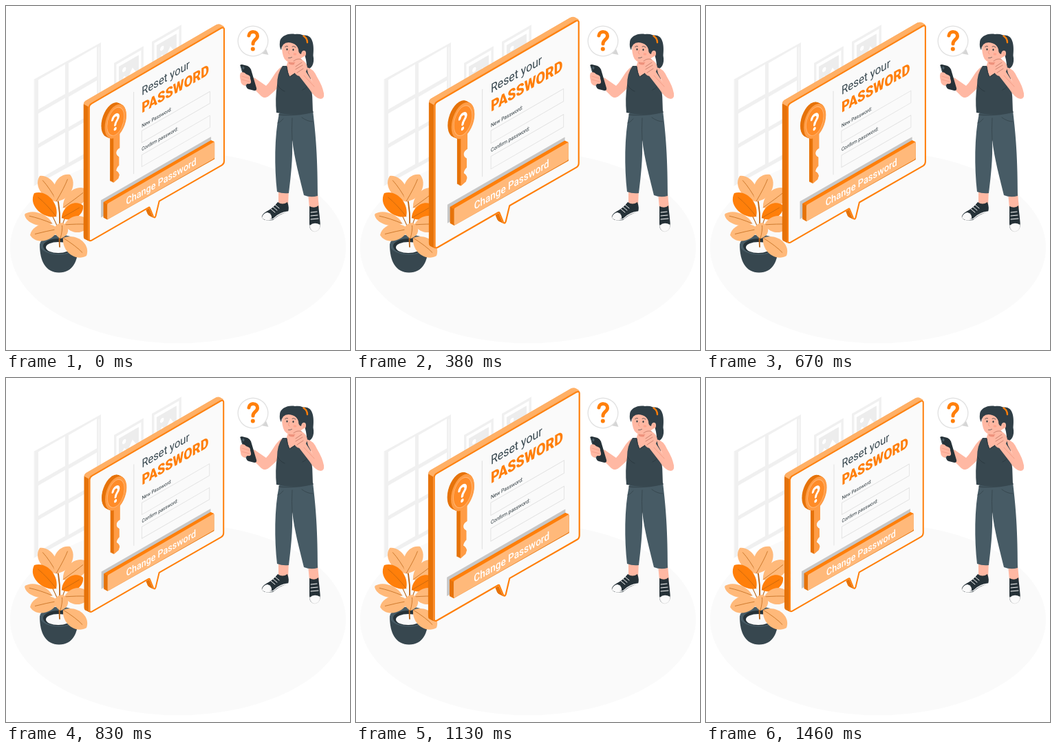
Write an HTML page with a canvas that moves like this. It is 500 px wide and 500 px high and loops after 1.5 s.

```html
<!DOCTYPE html>
<html lang="en">
<head>
<meta charset="utf-8">
<title>Reset your password</title>
<style>
html, body { margin: 0; width: 100%; height: 100%; overflow: hidden; background: #fff; }
canvas { display: block; width: 500px; height: 500px; }
</style>
</head>
<body>
<canvas id="stage"></canvas>
<script>
const canvas = document.getElementById('stage');
const ctx = canvas.getContext('2d');
const ratio = window.devicePixelRatio || 1;
canvas.width = canvas.height = 500 * ratio;

const ORANGE = '#ff7f0a', DEEP = '#e6730a', LIGHT = '#ffb97a', INK = '#263238',
      HAIR = '#2f3e46', SLATE = '#37474f', DENIM = '#475b65', SKIN = '#ffb8a3',
      BLUSH = '#ee927c', PAPER = '#fafafa', MIST = '#f0f0f0', LINE = '#e0e0e0', VEIN = '#b9600f';

function fill(path, color) {
  ctx.fillStyle = color;
  ctx.fill(new Path2D(path));
}

function line(path, color, width = 1) {
  ctx.strokeStyle = color;
  ctx.lineWidth = width;
  ctx.stroke(new Path2D(path));
}

function ellipse(x, y, rx, ry, color, turn = 0) {
  ctx.fillStyle = color;
  ctx.beginPath();
  ctx.ellipse(x, y, rx, ry, turn, 0, Math.PI * 2);
  ctx.fill();
}

// Runs draw() on the isometric wall plane with its origin at (x, y).
function onWall(x, y, draw) {
  ctx.save();
  ctx.transform(0.866, -0.5, 0, 1, x, y);
  draw();
  ctx.restore();
}

function wallText(text, x, y, font, color) {
  onWall(x, y, () => {
    ctx.font = font + ' Roboto, sans-serif';
    ctx.fillStyle = color;
    ctx.fillText(text, 0, 0);
  });
}

function questionMark(x, y, size, color, weight) {
  ctx.save();
  ctx.translate(x, y);
  ctx.scale(size, size);
  line('M-6 -7 C-5 -14.5 6.5 -14 6.5 -6.5 C6.5 -1 0 -1 0 5', color, weight);
  ellipse(-0.2, 12.5, weight * 0.6, weight * 0.6, color);
  ctx.restore();
}

function drawWindow() {
  fill('M40 107 L138 53 V208 L40 262 Z', MIST);
  line('M40.5 107 V261', PAPER, 1.5);
  for (const [x, w] of [[47, 39], [91, 41]]) {
    for (const [y, h] of [[4, 43], [53, 44], [103, 46]]) {
      onWall(x, 107 - (x - 40) * 0.551 + y, () => {
        ctx.fillStyle = '#fff';
        ctx.fillRect(0, 0, w / 0.866, h);
      });
    }
  }
  line('M135 60 V204', PAPER, 1);
}

function drawPicture(x, y) {
  onWall(x, y, () => {
    ctx.fillStyle = MIST;
    ctx.fillRect(0, 0, 49.5, 68);
    ctx.fillStyle = '#fff';
    ctx.fillRect(4, 4, 41.5, 60);
    ctx.fillStyle = '#ededed';
    ctx.fillRect(8, 9, 33.5, 50);
    fill('M8 40 L17 27 L23 34 L31 22 L41.5 38 V59 H8 Z', '#fff');
    ellipse(17, 18, 3.2, 3.2, '#fff');
  });
}

function leaf(x1, y1, x2, y2, width, color) {
  const length = Math.hypot(x2 - x1, y2 - y1);
  ctx.save();
  ctx.translate(x1, y1);
  ctx.rotate(Math.atan2(y2 - y1, x2 - x1));
  ctx.scale(length, width);
  fill('M0 0 C.2 -.65 .85 -.78 1 0 C.85 .65 .25 .7 0 0 Z', color);
  ctx.restore();
  line(`M${x1} ${y1} Q${(x1 + x2) / 2 + 2} ${(y1 + y2) / 2 - 1} ${x1 + (x2 - x1) * 0.82} ${y1 + (y2 - y1) * 0.82}`, VEIN, 0.7);
}

function drawPlant() {
  fill('M49 346 C49 372 58 387 77 387.5 C97 387 105 372 105 346 Z', SLATE);
  ellipse(77, 347, 28, 14.5, DENIM);
  ellipse(77, 349, 23, 11, INK);
  ellipse(76, 351, 18, 8, PAPER);
  line('M78 350 C76 325 82 304 73 272', VEIN, 1.8);
  line('M78 337 C82 313 88 300 99 281 M77 326 Q66 300 57 286', VEIN, 1.1);
  leaf(74, 284, 49, 247, 22, LIGHT);
  leaf(73, 284, 93, 245, 25, LIGHT);
  leaf(83, 293, 118, 267, 23, LIGHT);
  leaf(73, 306, 41, 272, 25, ORANGE);
  leaf(81, 308, 112, 290, 20, ORANGE);
  leaf(67, 316, 27, 303, 17, LIGHT);
  leaf(85, 318, 121, 317, 23, LIGHT);
  leaf(76, 324, 35, 333, 23, LIGHT);
  leaf(79, 338, 82, 315, 19, LIGHT);
  leaf(83, 337, 117, 363, 25, LIGHT);
}

const FRONT = 'M121 148 Q121 144 125 141.5 L311.5 33 Q316.7 31 316.7 36 V225 Q316.7 229.5 313 231.7 ' +
  'L223.5 283 L218.5 304 Q216.5 309.5 213 304.5 L208 292.3 L126.5 339.3 Q121 342 121 336 Z';

function drawKey() {
  const face = '#ff9c45';
  const shaft = 'M157 186 L166 182 V206 Q161 209 161 213 Q161 217 165 219 V231 ' +
    'Q161 235 161 239 Q165 241 165.5 245 L164 250 L157 256 Z';
  const head = color => onWall(160, 168, () => ellipse(0, 0, 18, 23, color));
  for (let depth = 5; depth >= 0; depth -= 0.5) {
    ctx.save();
    ctx.translate(-depth, -depth * 0.5);
    const color = depth ? DEEP : face;
    fill(shaft, color);
    head(color);
    ctx.restore();
  }
  onWall(160, 168, () => {
    ellipse(0, 0, 14.6, 19.4, LIGHT);
    ellipse(0, 0, 13.8, 18.6, '#ff8c28');
    questionMark(-0.5, 0.6, 0.78, '#fff', 5);
  });
}

function drawButton() {
  fill('M139 281 L297 190 V214 L139 306 Z', '#c7c7c7');
  fill('M142.5 284 L297 195 L302 198 V222 L148 309 L142.5 306 Z', DEEP);
  fill('M143 284 L297 195 L302 197 L148 287 Z', ORANGE);
  fill('M148 288 Q148 286 150 285 L300 198 Q302 197 302 199 V219 Q302 221 300 222 L150 308 Q148 309 148 307 Z', LIGHT);
  wallText('Change Password', 175, 288, '500 14.4px', '#fff');
}

function drawPanel() {
  for (let depth = 7; depth >= 0; depth -= 0.5) {
    ctx.save();
    ctx.translate(-depth, -depth * 0.5);
    fill(FRONT, depth ? DEEP : PAPER);
    ctx.restore();
  }
  fill('M114 143 Q114.5 139 118 137.5 L304 29.5 Q308 27.5 311 29 L316 32 L311 33 L125 141.5 Q121.5 143.5 121 147 Z', '#ffb066');
  ctx.save();
  ctx.clip(new Path2D(FRONT));
  line(FRONT, ORANGE, 4);
  ctx.restore();

  line('M186 126 V243', LINE, 1);
  drawKey();
  wallText('Reset your', 197.5, 131, '400 16.9px', SLATE);
  wallText('PASSWORD', 197.5, 156, '900 20.8px', ORANGE);
  wallText('New Password:', 197.5, 177, '400 7.2px', INK);
  wallText('Confirm password:', 197.5, 210.5, '400 7.2px', INK);
  for (const y of [181.5, 216]) {
    onWall(197.5, y, () => {
      ctx.strokeStyle = LINE;
      ctx.lineWidth = 0.9;
      ctx.strokeRect(0, 0, 113, 17);
    });
  }
  drawButton();
}

function drawBubble() {
  fill('M371 69 L381.5 71 L377 60 Z', '#d5d5d5');
  ellipse(359, 51, 22.5, 22.5, LINE);
  ellipse(359, 51, 21.2, 21.2, '#fff');
  questionMark(359, 50, 1, ORANGE, 5);
}

function drawLegs() {
  fill('M396 266 H411 L410 290 H396 Z M439 272 H453 L455 294 H441 Z', SKIN);
  fill('M397 156 L446 152 C449 178 453 210 453 276 Q443 279 433 275 C427 250 419 222 416 194 C417 222 414 247 411 272 ' +
    'Q402 273 394 270 C390 234 390 190 397 156 Z', DENIM);
  line('M416 163 Q415 180 416 196 M403 164 Q399 169 395 170 M430 162 Q438 168 446 168', SLATE, 0.9);
  line('M397 158 Q421 160 446 154', SLATE, 1.6);
}

function drawShoes() {
  fill('M395 285 Q402 290 409 285 Q412 293 410 299 Q398 302 388 311 Q376 313 372 308 Q371 303 378 299 Q388 294 395 285 Z', INK);
  fill('M372 307 Q374 301 380 300 Q387 302 386 309 Q377 313 372 307 Z', PAPER);
  line('M372.5 308 Q380 313 389 309 Q398 300 410 299', '#fff', 1.3);
  line('M385 295 l6 5 M388 292 l6 5 M391 289 l6 5', '#fff', 1);
  fill('M441 291 Q449 295 454 290 Q456 306 457 319 Q455 329 447 328 Q440 325 441 316 Z', INK);
  fill('M441.5 319 Q448 313 456.5 318 Q457 328 448 328.5 Q441 326 441.5 319 Z', PAPER);
  line('M441 318 Q443 328 449 328 Q457 326 457 317', LINE, 0.8);
  line('M443 300 l9 -1 M443 305 l10 -1 M443 310 l11 -1', '#fff', 1);
}

function drawHead() {
  fill('M430 43 C447 39 448 58 446.5 72 C449 84 444 92 437 92 C438 79 433 67 429 57 Z', HAIR);
  fill('M411 76 L426 74 L428 92 Q420 102 412 102 L407 89 Z', SKIN);
  fill('M411 80 Q418 83 425 77 L424 82 Q418 88 411 84 Z', BLUSH);
  fill('M402 53 Q412 46 428 52 L434 65 Q436 73 430 75 Q426 81 418 82 Q406 83 403 73 Q400 64 402 53 Z', SKIN);
  fill('M398 53 C398 44 410 39 420 41 C432 39 440 46 439 56 Q439 66 434 68 Q430 63 429 70 ' +
    'Q425 69 425 63 Q423 56 416 54 Q408 51 403 56 Q400 60 400 64 Q397 60 398 53 Z', HAIR);
  ellipse(433, 69, 3, 4.2, SKIN);
  line('M432 67 Q435 69 432 72', BLUSH, 0.7);
  line('M432.5 43.5 Q438 47 438 53', ORANGE, 2.4);
  ellipse(408.5, 63, 1, 1.5, INK);
  ellipse(417.5, 63.5, 1, 1.5, INK);
  line('M405.5 59.5 Q407 57.5 409.5 58.5 M416 59 Q418.5 57.5 421 60', INK, 0.7);
  line('M412 64 Q409 69 412 70', BLUSH, 0.8);
  line('M410.5 75.5 Q413 76 415.5 74.5', INK, 0.6);
  ellipse(420, 70, 2.4, 1.7, '#ffa58e');
}

function drawPhoneArm() {
  fill('M401 88 C391 94 388 106 378 116 L365 107 Q360 102 356 106 L359 119 L371 131 Q377 136 383 130 ' +
    'C391 123 396 119 399 111 Z', SKIN);
  fill('M341 88 Q339 85 343 85 L351 87 Q355 89 356 92 L364 119 Q365 123 361 123 L353 121 Q350 120 349 117 Z', INK);
  line('M341.5 88 L350 117', DENIM, 0.9);
  ellipse(345, 90, 1.5, 2.2, DENIM);
  fill('M341 97 Q346 95 349 99 Q356 101 355 105 L356 109 Q357 114 351 113 L347 116 Q341 114 341 108 Q339 102 341 97 Z', SKIN);
  line('M343 102 L353 105 M343 107 L354 110', BLUSH, 0.6);
}

function drawChinArm() {
  fill('M437 89 Q447 91 452 103 Q460 116 462 127 Q463 135 457 135 Q449 134 441 121 L424 99 ' +
    'L433 91 L446 111 L439 98 Z', SKIN);
  fill('M420 82 Q425 75 430 78 Q438 82 438 91 L434 99 Q426 105 421 99 Q417 94 421 91 Q417 86 420 82 Z', SKIN);
  line('M421 88 L430 82 M421 92 L431 86 M423 97 L432 91 M418 80 Q424 75 430 78', '#a9604f', 0.6);
  line('M433 101 L448 117', BLUSH, 0.7);
}

function drawWoman() {
  drawLegs();
  drawShoes();
  drawHead();
  drawPhoneArm();
  fill('M402 87 L408 87 Q409 96 412 103 Q419 99 425 92 L437 90 Q444 98 443 111 Q446 132 446 154 ' +
    'Q420 161 393 155 Q391 134 394 115 Q394 98 402 87 Z', SLATE);
  line('M408 88 Q409 97 412 103 Q420 99 426 92', INK, 1);
  line('M443 109 Q437 120 431 122 M395 115 Q399 122 405 124', INK, 0.6);
  drawChinArm();
}

// Two linear beats per loop; the second one relaxes more slowly.
function beatScale(time) {
  const phase = ((time - 862 + 1500) % 1500) / 1500;
  let swell;
  if (phase < 0.2) swell = phase / 0.2;
  else if (phase < 0.4) swell = (0.4 - phase) / 0.2;
  else if (phase < 0.6) swell = (phase - 0.4) / 0.2;
  else swell = (1 - phase) / 0.4;
  return 1 + 0.1 * swell;
}

function drawScene(time) {
  ctx.setTransform(ratio, 0, 0, ratio, 0, 0);
  ctx.lineCap = ctx.lineJoin = 'round';
  ctx.fillStyle = '#fff';
  ctx.fillRect(0, 0, 500, 500);
  ellipse(250, 351, 244, 139.3, PAPER);
  drawWindow();
  drawPicture(157, 83);
  drawPicture(212, 52);
  drawPlant();
  drawBubble();
  drawWoman();

  const scale = beatScale(time);
  ctx.save();
  ctx.translate(215.5, 184.5);
  ctx.scale(scale, scale);
  ctx.translate(-215.5, -184.5);
  drawPanel();
  ctx.restore();
}

const start = performance.now();
function tick() {
  drawScene((performance.now() - start) % 1500);
  requestAnimationFrame(tick);
}
tick();
</script>
</body>
</html>
```
